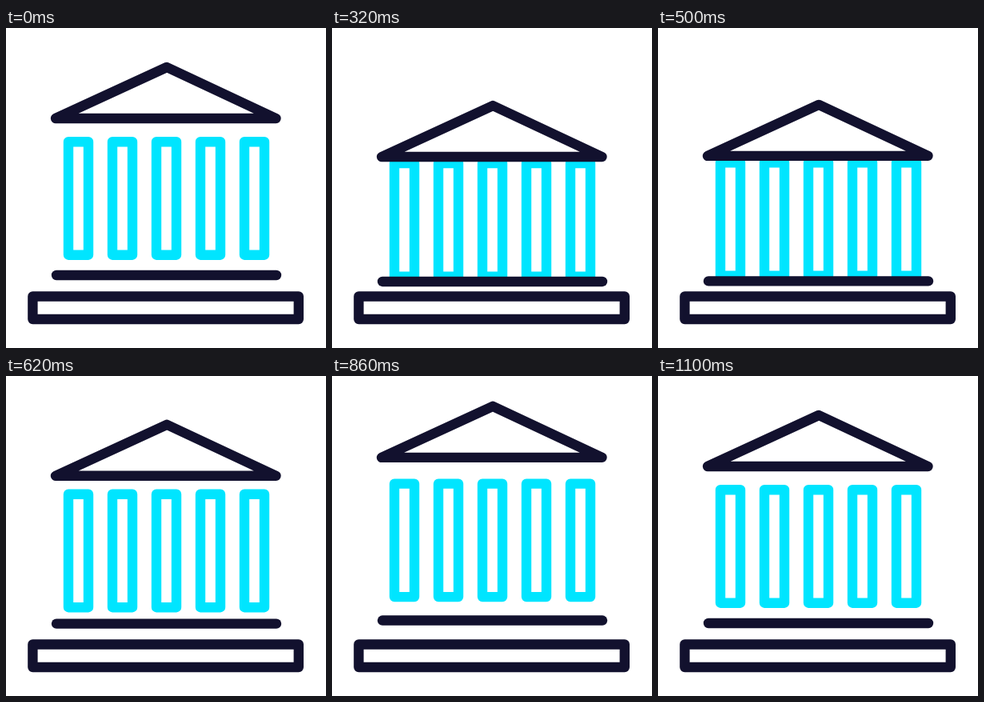
Recreate the animation shown at these times as an HTML page. Size 400 px wide and 400 px high, loop 1.13 s.

```html
<!DOCTYPE html>
<html lang="en">
<head>
<meta charset="utf-8">
<title>Bank</title>
<style>
  html, body { margin: 0; width: 100%; height: 100%; overflow: hidden; background: #fff; }
  svg { display: block; width: 100%; height: 100%; }
</style>
</head>
<body>
<svg viewBox="0 0 400 400" fill="none" stroke="#12112e" stroke-width="12.4" stroke-linecap="round" stroke-linejoin="round">
  <path id="columns" stroke="#00e5ff"/>
  <path id="roof" d="M62 113H337.5L201 49Z"/>
  <path id="step" d="M63 309H338"/>
  <path d="M33.4 335.5H365.8V364H33.4Z"/>
</svg>
<script>
const LOOP = 1130, HOLD = 230, STEP = 30;
const PRESS = 163, LOW = 390, HIGH = 770, REST = 1100;

// Lowest and highest offset of each moving part
const parts = [
  ["roof", 61.3, -13.5],
  ["columns", 34.4, -9.2],
  ["step", 10.2, -4.2],
].map(([id, low, high]) => ({ el: document.getElementById(id), low, high }));

parts[1].el.setAttribute("d",
  [0, 1, 2, 3, 4].map(i => `M${78 + i * 55} 142.2h25v141.5h-25z`).join(""));

function ease(t, start, end, from, to) {
  const u = (t - start) / (end - start);
  return from + (to - from) * (1 - Math.cos(Math.PI * u)) / 2;
}

function offset(t, low, high) {
  if (t < HOLD || t >= REST) return 0;
  if (t < LOW) return ease(t, PRESS, LOW, 0, low);
  if (t < HIGH) return ease(t, LOW, HIGH, low, high);
  return ease(t, HIGH, REST, high, 0);
}

function draw() {
  const now = performance.now() % LOOP;
  const t = now < HOLD ? 0 : HOLD + Math.floor((now - HOLD) / STEP) * STEP;
  for (const { el, low, high } of parts) {
    el.setAttribute("transform", `translate(0 ${offset(t, low, high).toFixed(2)})`);
  }
  requestAnimationFrame(draw);
}
draw();
</script>
</body>
</html>
```
